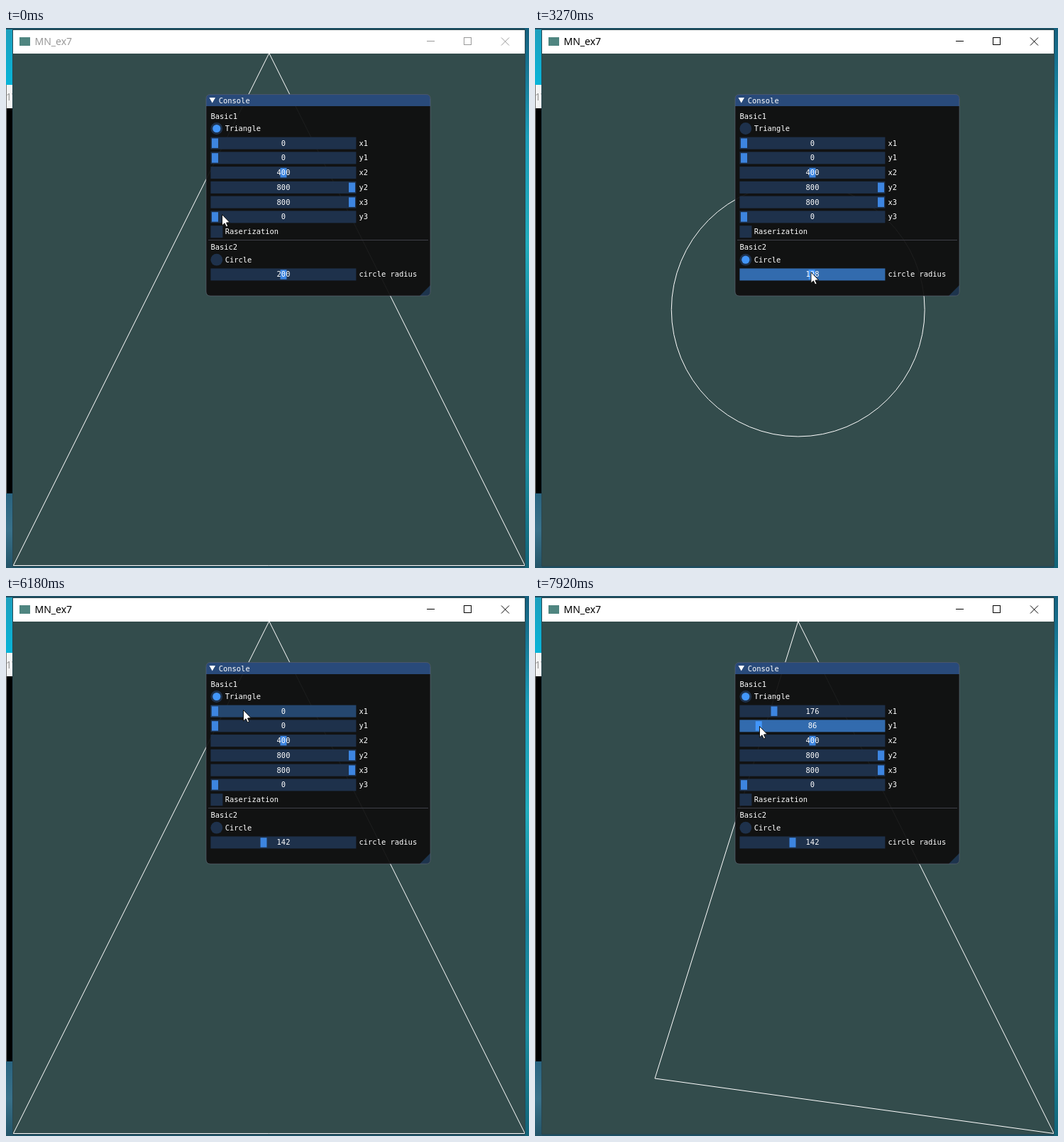
An HTML page with a canvas for the animation above (8000 ms loop, 737 px wide and 760 px high).

```html
<!DOCTYPE html>
<html lang="en">
<head>
<meta charset="utf-8">
<title>Shape console</title>
<style>
html, body { margin: 0; width: 100%; height: 100%; overflow: hidden; background: #334c4c; }
canvas { display: block; }
</style>
</head>
<body>
<canvas id="stage" width="737" height="760"></canvas>
<script>
const g = document.getElementById('stage').getContext('2d');
const LOOP = 8000;
const COLOR = {
  frame: '#1e314b', hover: '#25476f', active: '#326bae',
  grab: '#3d85e0', grabActive: '#4296fa', mark: '#4296fa', line: '#3f4049'
};

// The picture refreshes in even steps inside each of these spans.
const SPANS = [[120, 8], [1200, 9], [2340, 8], [3390, 8], [4440, 8], [5490, 8], [6570, 8], [7650, 2.6]];

// Tracks: time followed by one or more values.
const POINTER = [
  [-120, 284, 262], [0, 304, 262], [750, 298, 326], [1450, 298, 327], [2340, 361, 382],
  [3100, 391, 344], [3915, 365, 335], [4150, 363, 337], [4450, 363, 338], [4980, 292, 184],
  [5096, 283, 156], [5350, 297, 141], [5700, 298, 142], [6000, 332, 160], [6165, 334, 160],
  [6480, 295, 163], [7000, 337, 163], [7380, 309, 163], [7600, 296, 182], [7920, 316, 183]
];
const RADIUS = [[3180, 200], [3915, 144], [4150, 142]];
const X1 = [[6500, 0], [7050, 176]];
const Y1 = [[7600, 0], [7920, 86]];
const CIRCLE_ON = 1070, TRIANGLE_ON = 5500, LAG = 120;

function refreshTime(t) {
  if (t < SPANS[0][0]) return 0;
  const i = SPANS.findLastIndex(s => t >= s[0]);
  const [start, count] = SPANS[i];
  const end = i + 1 < SPANS.length ? SPANS[i + 1][0] : LOOP;
  const gap = (end - start) / count;
  return Math.min(7920, start + Math.floor((t - start) / gap + 0.25) * gap);
}

function track(keys, t) {
  if (t <= keys[0][0]) return keys[0].slice(1);
  for (let i = 1; i < keys.length; i++) {
    const a = keys[i - 1], b = keys[i];
    if (t < b[0]) {
      const u = (t - a[0]) / (b[0] - a[0]), e = u * u * (3 - 2 * u);
      return a.slice(1).map((v, k) => v + (b[k + 1] - v) * e);
    }
  }
  return keys.at(-1).slice(1);
}

const value = (keys, t) => Math.round(track(keys, t)[0]);
const within = (t, a, b) => t >= a && t < b;

function rect(x, y, w, h, fill) {
  g.fillStyle = fill;
  g.fillRect(x, y, w, h);
}

function path(points, fill, stroke) {
  g.beginPath();
  points.forEach(([x, y]) => g.lineTo(x, y));
  g.closePath();
  if (fill) { g.fillStyle = fill; g.fill(); }
  if (stroke) { g.strokeStyle = stroke; g.stroke(); }
}

function disc(x, y, r, fill) {
  g.fillStyle = fill;
  g.beginPath();
  g.arc(x, y, r, 0, 7);
  g.fill();
}

function gradient(y0, y1, ...colors) {
  const grad = g.createLinearGradient(0, y0, 0, y1);
  colors.forEach((c, i) => grad.addColorStop(i / (colors.length - 1), c));
  return grad;
}

function label(text, x, midY, align = 'left') {
  g.font = '10.45px "DejaVu Sans Mono", monospace';
  g.textAlign = align;
  g.fillStyle = '#fff';
  g.fillText(text, x, midY + 3.5);
}

function desktop() {
  rect(0, 0, 737, 760, '#1d4f63');
  rect(0, 2, 10, 78, gradient(2, 80, '#1d9fbd', '#08b4d8'));
  rect(0, 80, 10, 33, '#f4f4f4');
  g.font = '14px "Noto Sans", sans-serif';
  g.textAlign = 'left';
  g.fillStyle = '#999';
  g.fillText('1\\', 0, 102);
  rect(0, 113, 10, 542, '#000');
  rect(0, 80, 1, 575, '#777');
  rect(0, 655, 10, 105, gradient(655, 760, '#2a6480', '#39718a', '#235468'));
  rect(731, 0, 6, 760, gradient(0, 760, '#145f7d', '#1c9db8', '#22adbd', '#18829b', '#1b8ea0', '#126377'));
}

function appWindow(focused) {
  rect(9, 2, 723, 756, '#29464f');
  rect(10, 3, 721, 33, '#fff');
  rect(10, 36, 721, 721, '#334c4c');
  rect(19, 13, 15, 12, '#4f8580');

  const ink = focused ? '#000' : '#999';
  g.font = '14px "Noto Sans", sans-serif';
  g.textAlign = 'left';
  g.fillStyle = ink;
  g.fillText('MN_ex7', 40.5, 24);
  rect(593, 18, 11, 1, ink);
  g.strokeStyle = ink;
  g.lineWidth = 1;
  g.strokeRect(645.5, 13.5, 10, 10);
  g.beginPath();
  g.moveTo(698, 13.5); g.lineTo(709, 24.5);
  g.moveTo(709, 13.5); g.lineTo(698, 24.5);
  g.stroke();
}

function drawing(circle, radius, x1, y1) {
  const k = 721 / 800;
  g.save();
  g.beginPath();
  g.rect(10, 36, 721, 721);
  g.clip();
  g.strokeStyle = '#fff';
  g.lineWidth = 1;
  if (circle) {
    g.beginPath();
    g.arc(370.7, 396.5, radius * k, 0, 7);
    g.stroke();
  } else {
    path([[x1, y1], [400, 800], [800, 0]].map(([x, y]) => [10.3 + x * k, 756.5 - y * k]), null, '#fff');
  }
  g.restore();
}

function slider(name, y, v, max, active, [mx, my], anyActive) {
  const hot = !anyActive && mx > 288 && mx < 494 && my > y && my < y + 17.1;
  rect(288.4, y, 205, 17, active ? COLOR.active : hot ? COLOR.hover : COLOR.frame);
  rect(290 + v / max * 193, y + 1.8, 9, 13.5, active ? COLOR.grabActive : COLOR.grab);
  label(v, 391, y + 8.5, 'center');
  label(name, 497.5, y + 8.5);
}

function radio(name, y, on) {
  disc(296.8, y, 8.4, COLOR.frame);
  if (on) disc(296.8, y, 5.6, COLOR.mark);
  label(name, 308.7, y);
}

function panel(t, circle, radius, x1, y1) {
  g.beginPath();
  g.roundRect(282, 93.5, 316, 283.5, 6);
  g.fillStyle = 'rgba(15,15,15,.94)';
  g.fill();
  g.save();
  g.clip();
  rect(282, 93, 316, 17, '#294a7a');
  path([[598, 362], [598, 377], [583, 377]], '#1d344d');
  g.restore();
  g.strokeStyle = 'rgba(110,110,128,.5)';
  g.lineWidth = 1;
  g.stroke(new Path2D('M288 93.5H592Q598 93.5 598 99.5V371Q598 377 592 377H288Q282 377 282 371V99.5Q282 93.5 288 93.5Z'));
  path([[286.5, 98], [295, 98], [290.7, 105.5]], '#fff');
  label('Console', 299.7, 102);

  const mouse = track(POINTER, t - LAG);
  const dragR = within(t, 3170, 4300), dragX = within(t, 6500, 7080), dragY = t >= 7600;
  const busy = dragR || dragX || dragY;
  label('Basic1', 288.4, 124);
  radio('Triangle', 141.5, !circle);
  [['x1', x1, dragX], ['y1', y1, dragY], ['x2', 400], ['y2', 800], ['x3', 800], ['y3', 0]]
    .forEach(([name, v, active], i) => slider(name, 153.6 + i * 20.75, v, 800, active, mouse, busy));
  rect(288.4, 278.2, 17, 17, COLOR.frame);
  label('Raserization', 308.7, 286.8);
  rect(285, 298, 310, 1, COLOR.line);
  label('Basic2', 288.4, 308.5);
  radio('Circle', 326.2, circle);
  slider('circle radius', 338.4, radius, 400, dragR, mouse, busy);
}

function pointer([x, y]) {
  g.save();
  g.translate(x + .5, y + .5);
  g.lineWidth = 1;
  path([[0, 0], [0, 15.5], [3.5, 12.3], [5.8, 17.3], [8.2, 16.3], [6, 11.5], [10.8, 11.2]], '#fff', '#111');
  g.restore();
}

function render(time) {
  const t = refreshTime(time % LOOP);
  const circle = within(t, CIRCLE_ON, TRIANGLE_ON);
  const radius = value(RADIUS, t), x1 = value(X1, t), y1 = value(Y1, t);
  desktop();
  appWindow(t >= CIRCLE_ON);
  drawing(circle, radius, x1, y1);
  panel(t, circle, radius, x1, y1);
  pointer(track(POINTER, t));
}

const begin = performance.now();
(function loop() {
  render(performance.now() - begin);
  requestAnimationFrame(loop);
})();
</script>
</body>
</html>
```
